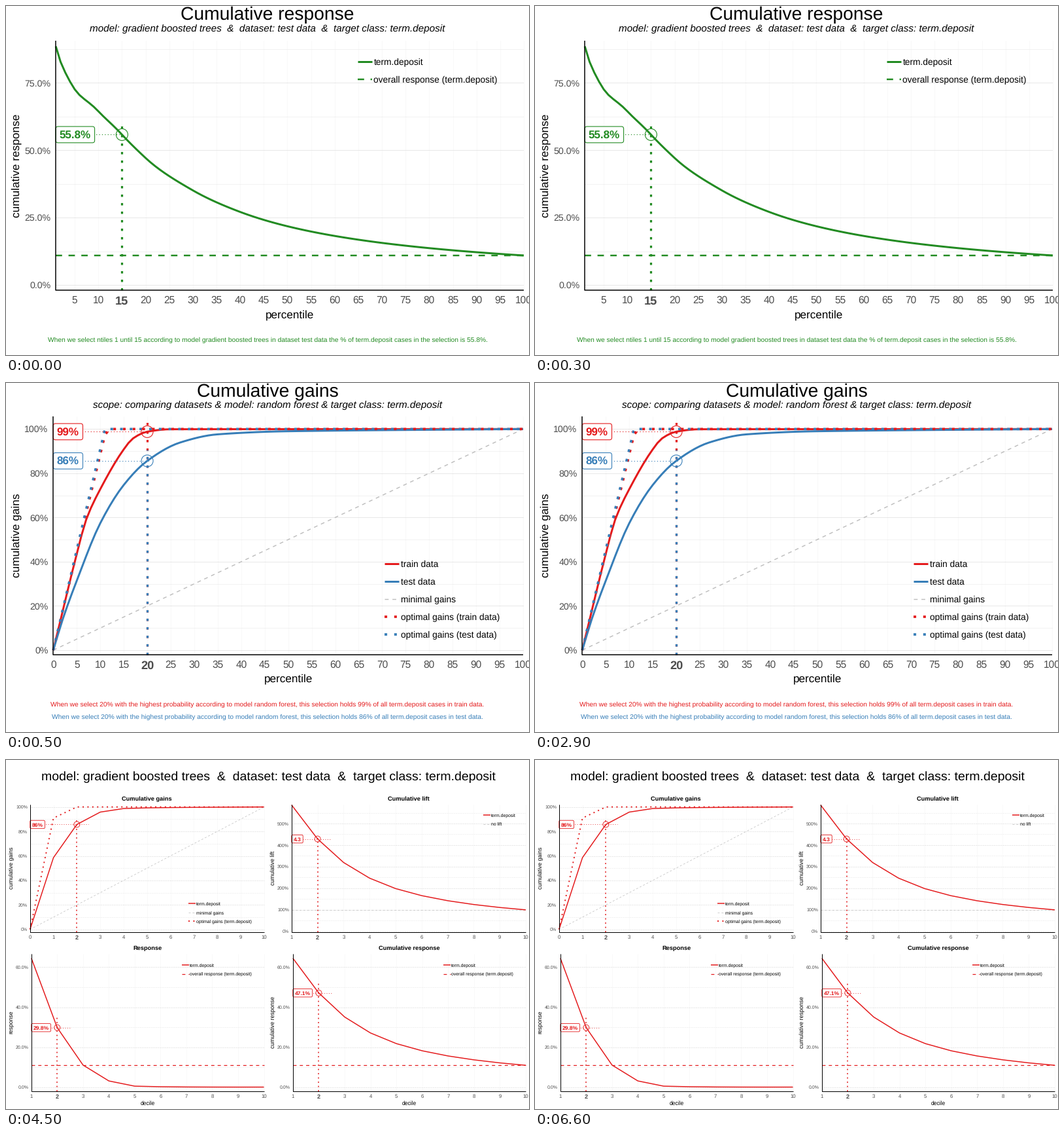
These frames come from a looping animation (800x533 px, 8000 ms). A matplotlib script:

```python
from itertools import count

import matplotlib.pyplot as plt
import numpy as np
from matplotlib.animation import FuncAnimation
from matplotlib.patches import Circle, FancyBboxPatch

W, H, DPI = 800, 533, 100
PT = 72 / DPI  # points per pixel

GREEN, RED, BLUE, GREY = "#228B22", "#E41A1C", "#377EB8", "#BEBEBE"
TICK = "#4D4D4D"
SOLID, DASHED, DOTTED, FINE = "-", (0, (4, 4)), (0, (1.1, 2.9)), (0, (1, 1))
THIN, MEDIUM, THICK, HEAVY = 1.45, 2.45, 3.0, 3.7

plt.rcParams["font.family"] = "Liberation Sans"
plt.rcParams["text.hinting"] = "none"
fig = plt.figure(figsize=(W / DPI, H / DPI), dpi=DPI, facecolor="white")
order = count(1)


# ---- model behaviour: gains in % by share selected in % ----

def smooth(*knots):
    """A rising curve through a few knots (Hermite, harmonic tangents)."""
    x, y = np.array(knots, float).T
    d = np.diff(y) / np.diff(x)
    inner = 2 * d[:-1] * d[1:] / (d[:-1] + d[1:] + 1e-9)
    m = np.concatenate([d[:1], inner, d[-1:]])

    def f(v):
        v = np.asarray(v, float)
        i = np.clip(np.searchsorted(x, v) - 1, 0, len(d) - 1)
        h = x[i + 1] - x[i]
        t = (v - x[i]) / h
        return (y[i] + (y[i + 1] - y[i]) * t * t * (3 - 2 * t)
                + h * t * (1 - t) * (m[i] * (1 - t) - m[i + 1] * t))
    return f


def optimal(share):
    return lambda v: np.minimum(100, 100 * np.asarray(v) / share)


SHARE = 11.0  # overall response in %
boosted = smooth((0, 0), (1, 8.05), (3, 21.5), (5, 33), (10, 58.6),
                 (15, 76.1), (20, 85.7), (30, 95.8), (40, 98.7), (60, 99.5),
                 (100, 100))
forest_train = smooth((0, 0), (1, 8.8), (5, 43.5), (7, 59), (10, 72.8),
                      (15, 90.8), (17, 95.8), (20, 98.8), (25, 99.9),
                      (100, 100))
forest_test = smooth((0, 0), (2, 13.9), (5, 31.4), (10, 57.4), (15, 74.7),
                     (20, 85.6), (27, 93.9), (35, 97.6), (50, 99), (100, 100))


def lift(v):
    return 100 * boosted(v) / v


def cum_response(v):
    return SHARE * boosted(v) / v


def response(v):
    return SHARE * (boosted(v) - boosted(v - 10)) / 10


# ---- drawing ----

def stage():
    """A full-size axes measured in pixels, y pointing down."""
    ax = fig.add_axes([0, 0, 1, 1])
    ax.set_xlim(0, W)
    ax.set_ylim(H, 0)
    ax.axis("off")
    return ax


def write(ax, x, y, s, size, color="black", ha="center", **kw):
    return ax.text(x, y, s, fontsize=size * PT, color=color, ha=ha,
                   va="baseline", rotation_mode="anchor",
                   zorder=next(order), **kw)


def stroke(ax, xs, ys, color, lw, style=SOLID):
    ax.plot(xs, ys, color=color, lw=lw * PT, ls=style, zorder=next(order),
            solid_capstyle="butt", dash_capstyle="butt",
            solid_joinstyle="round", dash_joinstyle="round")


class Panel:
    """A plot area in pixels; x is in %, k scales text and line weights."""

    def __init__(self, ax, xlim, span, rows, zero, step, gap, k=1.0):
        self.ax, self.xlim, self.k = ax, xlim, k
        self.left, self.right = span
        self.top, self.bottom = rows
        self.zero, self.step, self.gap = zero, step, gap
        self.hair = 0.6 + 0.5 * k
        room = (zero - self.top) / gap  # height counted in steps
        self.major = step * np.arange(0, room)
        self.minor = step * np.arange(0.5, room)

    def px(self, v):
        a, b = self.xlim
        return self.left + (v - a) * (self.right - self.left) / (b - a)

    def py(self, v):
        return self.zero - v * self.gap / self.step

    def grid(self, xticks):
        for v in xticks:
            stroke(self.ax, [self.px(v)] * 2, [self.top, self.bottom],
                   "#F9F9F9", self.hair)
        for values, color in ((self.minor, "#E6E6E6"),
                              (self.major, "#D2D2D2")):
            for v in values:
                self.level(v, color, 1 / self.k ** 0.5, FINE)

    def level(self, v, color, lw, style=DASHED):
        stroke(self.ax, [self.left, self.right], [self.py(v)] * 2, color,
               lw * self.k, style)

    def curve(self, f, xs, color, lw, style=SOLID):
        xs = np.array(xs)
        stroke(self.ax, self.px(xs), self.py(f(xs)), color, lw * self.k,
               style)

    def mark(self, x, y, rise, reach, color):
        """Dotted guides and a ring around the chosen point."""
        cx, cy = self.px(x), self.py(y)
        stroke(self.ax, [cx, cx], [self.bottom, self.py(y + rise)], color,
               3.25 * self.k, DOTTED)
        stroke(self.ax, [self.left, self.px(x + reach)], [cy, cy], color,
               self.hair, DOTTED)
        self.ax.add_patch(Circle((cx, cy), 9 * self.k, fill=False, ec=color,
                                 lw=self.hair * PT, zorder=next(order)))

    def tag(self, y, text, color):
        k, cy, pad, h = self.k, self.py(y), 5.6 * self.k, 24.8 * self.k
        under = next(order)
        label = write(self.ax, self.left + pad, cy + 6.2 * k, text, 17 * k,
                      color, "left", weight="bold")
        width = label.get_window_extent().width + 2 * pad
        self.ax.add_patch(FancyBboxPatch(
            (self.left, cy - h / 2), width, h,
            boxstyle=f"round,pad=0,rounding_size={3.4 * k}",
            fc="white", ec=color, lw=self.hair * PT, zorder=under))

    def legend(self, x, y, *rows):
        k = self.k
        for i, (text, color, lw, style) in enumerate(rows):
            ry = y + 27.2 * k * i
            stroke(self.ax, [x, x + 22 * k], [ry, ry], color, lw * k, style)
            write(self.ax, x + 24.5 * k, ry + 5 * k, text, 13.8 * k,
                  ha="left")

    def axes(self, xticks, chosen, fmt, ylabel, ybase, xlabel="", unit=1):
        """Axis lines, tick labels and axis titles."""
        ax, k = self.ax, self.k
        stroke(ax, [self.left, self.left, self.right],
               [self.top, self.bottom, self.bottom], "black", 0.5 + k)
        for v in xticks:
            x, y, s = self.px(v), self.bottom + 20.1 * k, str(v // unit)
            if v == chosen:
                write(ax, x, y + 2 * k, s, 18.3 * k, TICK, weight="bold")
            else:
                write(ax, x, y, s, 15.5 * k, TICK)
        for v in self.major:
            write(ax, self.left - 7.8 * k, self.py(v) + 5 * k, fmt.format(v),
                  14.1 * k, TICK, "right")
        write(ax, ybase, (self.top + self.bottom) / 2, ylabel, 17.2 * k,
              rotation=90)
        write(ax, self.middle(), self.bottom + 42.4 * k, xlabel, 17.1 * k)

    def middle(self):
        return (self.left + self.right) / 2


def headline(ax, y, title, subtitle):
    write(ax, W / 2, y, title, 28.2)
    write(ax, W / 2, y + 17.2, subtitle, 15.3, style="italic")


MODEL = ("model: gradient boosted trees  &  dataset: test data  &  "
         "target class: term.deposit")


def response_scene():
    ax = stage()
    headline(ax, 21.5, "Cumulative response", MODEL)
    p = Panel(ax, (1, 100), (76.2, 792), (53, 434.2), 426.3, 25, 102.97)
    ticks, n = range(5, 101, 5), 15
    best = cum_response(n)
    p.grid(ticks)
    p.level(SHARE, GREEN, MEDIUM)
    p.curve(cum_response, range(1, 101), GREEN, THICK)
    p.mark(n, best, 5, 0.5, GREEN)
    p.tag(best, f"{best:.1f}%", GREEN)
    p.legend(538, 85, ("term.deposit", GREEN, THICK, SOLID),
             ("overall response (term.deposit)", GREEN, MEDIUM, DASHED))
    p.axes(ticks, n, "{:.1f}%", "cumulative response", 20.8, "percentile")
    write(ax, W / 2, 513, f"When we select ntiles 1 until {n} according to "
          "model gradient boosted trees in dataset test data the % of "
          f"term.deposit cases in the selection is {best:.1f}%.", 10.3, GREEN)
    return ax


def gains_scene():
    ax = stage()
    headline(ax, 21, "Cumulative gains", "scope: comparing datasets & model: "
             "random forest & target class: term.deposit")
    p = Panel(ax, (0, 100), (72.3, 791), (51, 414.5), 408, 20, 67.54)
    ticks, all_x, n = range(0, 101, 5), range(101), 20
    models = (("train", forest_train, SHARE + 0.3, RED),
              ("test", forest_test, SHARE, BLUE))
    p.grid(ticks)
    p.curve(lambda v: v, [0, 100], GREY, THIN, DASHED)
    for _, f, _, color in models:
        p.curve(f, all_x, color, THICK)
    for _, _, share, color in models:
        p.curve(optimal(share), all_x, color, HEAVY, DOTTED)
    for _, f, _, color in models:
        p.mark(n, f(n), 5, 0.5, color)
    for i, (name, f, _, color) in enumerate(models):
        p.tag(f(n), f"{f(n):.0f}%", color)
        write(ax, W / 2, 494 + 19 * i, f"When we select {n}% with the highest "
              "probability according to model random forest, this selection "
              f"holds {f(n):.0f}% of all term.deposit cases in {name} data.",
              10.3, color)
    p.legend(579, 275.5, ("train data", RED, THICK, SOLID),
             ("test data", BLUE, THICK, SOLID),
             ("minimal gains", GREY, THIN, DASHED),
             ("optimal gains (train data)", RED, HEAVY, DOTTED),
             ("optimal gains (test data)", BLUE, HEAVY, DOTTED))
    p.axes(ticks, n, "{:.0f}%", "cumulative gains", 20.8, "percentile")
    return ax


def overview_scene():
    ax = stage()
    write(ax, 401, 31.5, MODEL, 19.45)
    main = ("term.deposit", RED, THICK, SOLID)
    overall = ("overall response (term.deposit)", RED, MEDIUM, DASHED)
    upper, lower = (68, 262.5), (296, 505.5)
    n, k = 20, 0.5

    def finish(p, f, ticks, title, label, fmt, ybase, xlabel=""):
        p.curve(f, ticks, RED, THICK)
        p.mark(n, f(n), 5, 5, RED)
        p.tag(f(n), label, RED)
        p.axes(ticks, n, fmt, title.lower(), ybase, xlabel, unit=10)
        write(ax, p.middle(), p.top - 6, title, 9.3, weight="bold")

    ticks = range(0, 101, 10)
    p = Panel(ax, (0, 100), (36.8, 394.7), upper, 258.7, 20, 37.4, k)
    p.grid(ticks)
    p.curve(lambda v: v, [0, 100], GREY, THIN, DASHED)
    p.curve(optimal(SHARE), ticks, RED, HEAVY, DOTTED)
    p.legend(279, 219.2, main, ("minimal gains", GREY, THIN, DASHED),
             ("optimal gains (term.deposit)", RED, HEAVY, DOTTED))
    finish(p, boosted, ticks, "Cumulative gains", f"{boosted(n):.0f}%",
           "{:.0f}%", 10.8)

    ticks = range(10, 101, 10)
    p = Panel(ax, (10, 100), (436.8, 795), upper, 261.8, 100, 32.96, k)
    p.grid(ticks)
    p.level(100, GREY, THIN)
    p.legend(729.5, 84, main, ("no lift", GREY, THIN, DASHED))
    finish(p, lift, ticks, "Cumulative lift", f"{lift(n) / 100:.1f}",
           "{:.0f}%", 411)

    for f, title, span, ybase in (
            (response, "Response", (38.8, 394.5), 10.8),
            (cum_response, "Cumulative response", (438.8, 795), 411)):
        p = Panel(ax, (10, 100), span, lower, 499.9, 20, 61.17, k)
        p.grid(ticks)
        p.level(SHARE, RED, MEDIUM)
        p.legend(span[0] + 230.2, 312.9, main, overall)
        finish(p, f, ticks, title, f"{f(n):.1f}%", "{:.1f}%", ybase, "decile")
    return ax


scenes = [response_scene(), gains_scene(), overview_scene()]
STARTS = (0, 500, 4500)
STEP, LOOP = 500, 8000


def update(i):
    current = sum(i * STEP >= s for s in STARTS) - 1
    for n, ax in enumerate(scenes):
        ax.set_visible(n == current)
    return scenes


anim = FuncAnimation(fig, update, frames=LOOP // STEP, interval=STEP,
                     init_func=lambda: update(0), repeat=True, repeat_delay=0,
                     blit=False)
plt.show()
```
